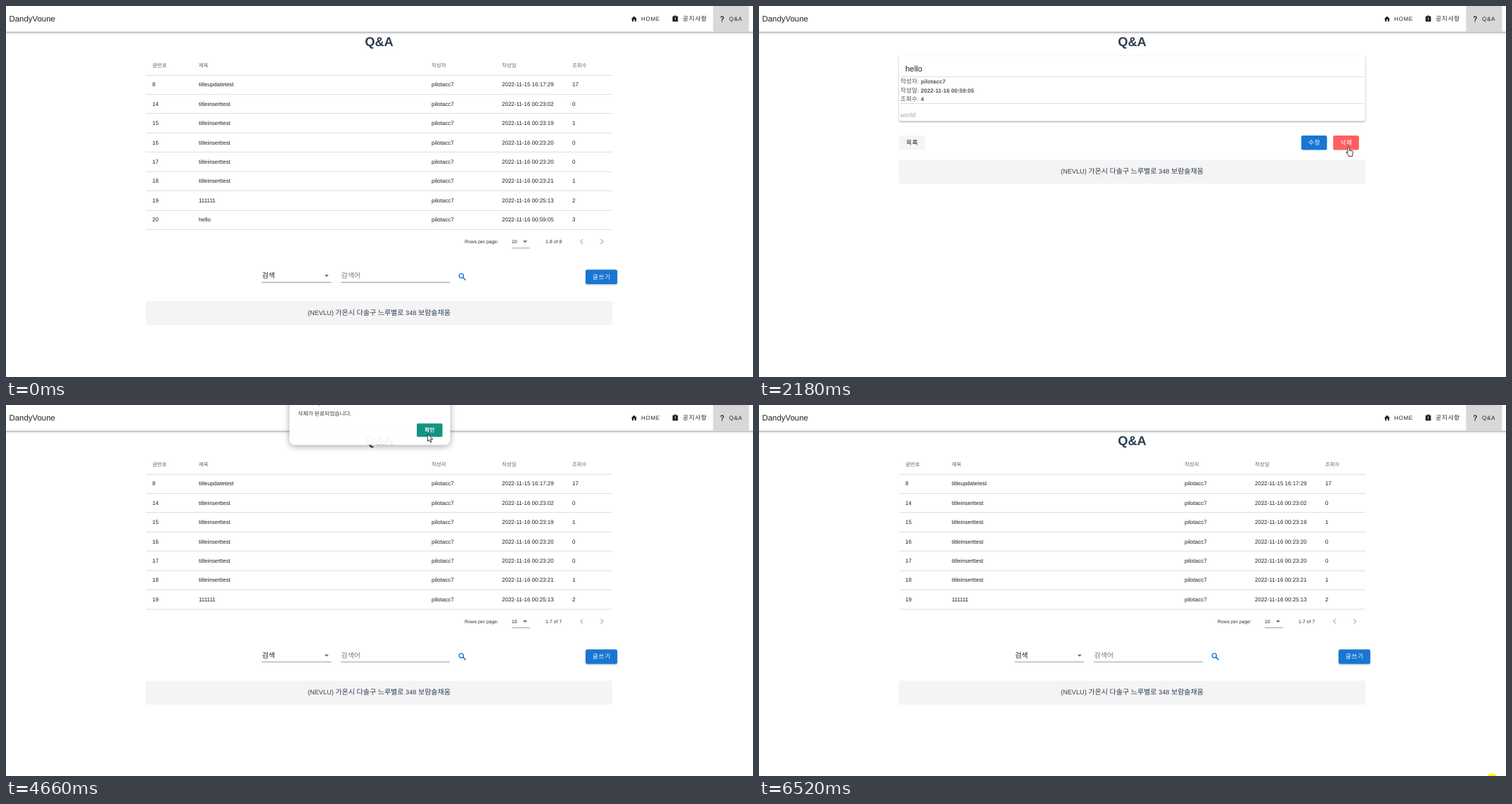
An HTML page for the animation above (6590 ms loop, 1062 px wide and 527 px high).

```html
<!DOCTYPE html>
<html lang="ko">
<head>
<meta charset="utf-8">
<title>Q&amp;A</title>
<style>
html, body { margin: 0; width: 100%; height: 100%; overflow: hidden; background: #fff; }
svg { display: block; width: 100vw; height: 100vh; }
text {
  font-family: "Liberation Sans", Arial, "Noto Sans CJK KR", "Noto Sans CJK", sans-serif;
  white-space: pre; text-rendering: geometricPrecision;
}
/* Hangul fills a full em here */
.ko { font-family: "Noto Sans CJK KR", "Noto Sans CJK", sans-serif; font-size: 1.087em; }
.btn { letter-spacing: .71px; font-weight: 500; }
.bar { filter: drop-shadow(0 1px 1.2px rgba(0,0,0,.32)) drop-shadow(0 1px 2px rgba(0,0,0,.16)); }
.card { filter: drop-shadow(0 1px .8px rgba(0,0,0,.4)); }
.raised { filter: drop-shadow(0 1px 1px rgba(0,0,0,.3)); }
.modal { filter: drop-shadow(0 2px 5px rgba(0,0,0,.36)); }
</style>
</head>
<body>
<svg id="stage" viewBox="0 0 1062 527" preserveAspectRatio="none"></svg>
<script>
const LOOP = 6590, LAG = 67;
const INK = '#212121', SOFT = '#666', BLUE = '#1976d2', NAVY = '#2c3e50';
const USER = 'pilotacc7';
const stage = document.getElementById('stage');

function add(parent, tag, attrs = {}) {
  const el = document.createElementNS('http://www.w3.org/2000/svg', tag);
  for (const k in attrs) el.setAttribute(k, attrs[k]);
  parent.appendChild(el);
  return el;
}
const group = (parent, attrs) => add(parent, 'g', attrs);
const box = (parent, x, y, width, height, fill, more) =>
  add(parent, 'rect', { x, y, width, height, fill, ...more });
const path = (parent, d, attrs) => add(parent, 'path', { d, ...attrs });

function text(parent, x, y, str, size, fill = INK, more) {
  const el = add(parent, 'text', { x, y, 'font-size': size, fill, ...more });
  for (const part of str.split(/([가-힣]+)/)) {
    if (!part) continue;
    const span = add(el, 'tspan', /[가-힣]/.test(part) ? { class: 'ko' } : {});
    span.textContent = part;
  }
  return el;
}
const icon = (parent, x, y, size, d, fill = INK) =>
  path(parent, d, { fill, 'fill-rule': 'evenodd', transform: `translate(${x} ${y}) scale(${size / 24})` });
const button = (parent, x, y, w, h, fill, label, ink, cls = '') => {
  const g = group(parent);
  box(g, x, y, w, h, fill, { rx: 2.3, class: cls });
  text(g, x + w / 2 + .35, y + h / 2 + 3, label, 8, ink, { 'text-anchor': 'middle', class: 'btn' });
  return g;
};
function footer(parent, y) {
  box(parent, 199, y, 663, 34, '#f4f4f4');
  text(parent, 530.5, y + 19.8, '(NEVLU) 가온시 다솔구 느루별로 348 보람솔채움', 9.2, NAVY, { 'text-anchor': 'middle' });
}
const show = (el, on) => el.setAttribute('visibility', on ? 'visible' : 'hidden');

// Page frame
text(stage, 530.5, 56.5, 'Q&A', 18.3, NAVY, { 'text-anchor': 'middle', 'font-weight': 700 });

// List page
const ROW = 27.43, TOP = 97.6;
const rowY = i => Math.round(TOP + ROW * i);
const COLS = [208, 274, 605, 705, 805];
const posts = [
  ['8', 'titleupdatetest', '15 16:17:29', '17'],
  ['14', 'titleinserttest', '16 00:23:02', '0'],
  ['15', 'titleinserttest', '16 00:23:19', '1'],
  ['16', 'titleinserttest', '16 00:23:20', '0'],
  ['17', 'titleinserttest', '16 00:23:20', '0'],
  ['18', 'titleinserttest', '16 00:23:21', '1'],
  ['19', '111111', '16 00:25:13', '2'],
  ['20', 'hello', '16 00:59:05', '3']
];
const list = group(stage);
['글번호', '제목', '작성자', '작성일', '조회수'].forEach((s, i) => text(list, COLS[i], 86.6, s, 6.86, SOFT));
const rows = posts.map(([id, title, date, views], i) => {
  const g = group(list), y = rowY(i);
  const glow = box(g, 199, y, 663, rowY(i + 1) - y, '#eee');
  [id, title, USER, '2022-11-' + date, views].forEach((s, c) => text(g, COLS[c], TOP + ROW * i + 16.7, s, 8));
  box(g, 199, y, 663, 1, '#dedede');
  return { g, glow };
});
const lower = group(list);
box(lower, 199, 317, 663, 1, '#dedede');
text(lower, 652, 337, 'Rows per page:', 6.86, '#333');
text(lower, 719, 337, '10', 6.86);
path(lower, 'M735 333.3h6l-3 3z', { fill: SOFT });
box(lower, 719, 343.5, 26, .8, '#8a8a8a');
const ranges = [8, 7].map(n => text(lower, 767, 337, `1-${n} of ${n}`, 6.86, '#333'));
const chevron = { fill: 'none', stroke: '#a8a8a8', 'stroke-width': 1.1 };
path(lower, 'M820 331.2l-3.3 3.4l3.3 3.4', chevron);
path(lower, 'M845.4 331.2l3.3 3.4l-3.3 3.4', chevron);
text(lower, 364, 386.3, '검색', 9.14);
path(lower, 'M452.8 381.8h6l-3 3z', { fill: SOFT });
box(lower, 363.5, 392, 99, .8, '#808080');
text(lower, 476.5, 386.3, '검색어', 9.14, '#777');
box(lower, 476, 392, 155, .8, '#808080');
add(lower, 'circle', { cx: 647.3, cy: 383.3, r: 3.1, fill: 'none', stroke: BLUE, 'stroke-width': 1.3 });
path(lower, 'M649.5 385.5l4 4', { stroke: BLUE, 'stroke-width': 1.6 });
button(lower, 824, 374.6, 45, 20.5, BLUE, '글쓰기', '#fff', 'raised');
footer(lower, 419);

// Detail page
const detail = group(stage);
box(detail, 199, 71, 663, 92.5, '#fff', { rx: 2, class: 'card' });
text(detail, 208, 93, 'hello', 11.43);
box(detail, 201, 100, 659, 1, '#dedede');
[['작성자', USER], ['작성일', '2022-11-16 00:59:05'], ['조회수', '4']].forEach(([k, v], i) => {
  const y = 110.1 + 12.55 * i;
  text(detail, 201, y, k + ':', 8, '#555');
  text(detail, 230, y, v, 8, '#555', { 'font-weight': 700, 'letter-spacing': .06 });
});
box(detail, 201, 138, 659, 1, '#dedede');
text(detail, 201, 157.5, 'world', 9.14, '#a8a8a8');
button(detail, 199, 184, 37, 20.5, '#f5f5f5', '목록', INK);
button(detail, 771, 184, 36.5, 20.5, BLUE, '수정', '#fff');
button(detail, 816.3, 184, 36.7, 20.5, '#ff5252', '삭제', '#fff');
const ripple = box(detail, 816.3, 184, 36.7, 20.5, '#fff', { rx: 2.3 });
footer(detail, 218.3);

// App bar
const bar = group(stage);
box(bar, -10, -10, 1082, 46.6, '#fff', { class: 'bar' });
box(bar, 1005.3, 0, 51, 36.6, '#d8d8d8');
text(bar, 4.5, 22.3, 'DandyVoune', 11.43);
icon(bar, 887.8, 13.3, 10.3, 'M10 20V14H14V20H19V12H22L12 3L2 12H5V20Z');
icon(bar, 946.3, 13.3, 10.3, 'M5 3H9A3 3 0 0 1 15 3H19A2 2 0 0 1 21 5V19A2 2 0 0 1 19 21H5A2 2 0 0 1 3 19V5A2 2 0 0 1 5 3ZM11 7V13H13V7ZM11 15V17H13V15Z');
icon(bar, 1013, 13.3, 10.3, 'M10 19H13V22H10ZM12 2C17.4 2.2 19.7 7.6 16.5 11.7C15.7 12.7 14.3 13.3 13.7 14.2C13 15 13 16 13 17H10C10 15.3 10 13.9 10.7 12.9C11.3 11.9 12.7 11.3 13.5 10.7C15.9 8.4 15.3 5.3 12 5A3 3 0 0 0 9 8H6A6 6 0 0 1 12 2Z');
[[903, 'HOME'], [962, '공지사항'], [1028, 'Q&A']].forEach(([x, s]) =>
  text(bar, x, 21.3, s, 8, INK, { 'letter-spacing': .71 }));

// Dialogs
function modal(bottom, message, okX) {
  const g = group(stage);
  box(g, 403, -30, 228.5, bottom + 30, '#fff', { rx: 7, class: 'modal' });
  text(g, 415, bottom - 58, 'demo page 0000 내용:', 7.3, '#333');
  text(g, 415, bottom - 42.2, message, 7.2, '#333');
  const y = bottom - 30.6;
  const ok = box(g, okX, y, 36.5, 19, '#05c2a4', { rx: 1.5 });
  text(g, okX + 18.2, y + 12.2, '확인', 6.9, '#fff', { 'text-anchor': 'middle', 'font-weight': 700 });
  if (okX < 580) {
    box(g, 584, y + .3, 36, 18.4, '#fff', { rx: 1.5, stroke: '#e4e4e4', 'stroke-width': .8 });
    text(g, 602, y + 12.2, '취소', 6.9, '#333', { 'text-anchor': 'middle' });
  }
  return { g, ok, x: okX, y };
}
const ask = modal(59.3, '삭제하시겠습니까?', 543.7);
const done = modal(56.8, '삭제가 완료되었습니다.', 584);

const glint = add(stage, 'ellipse', { cx: 1042, cy: 528, rx: 6.5, ry: 4.6, fill: '#fff200' });

// Pointer
const skin = { fill: '#fff', stroke: '#111', 'stroke-width': .85, 'stroke-linejoin': 'round' };
const arrow = path(stage, 'M.4 .4V10.6L2.8 8.4L4.4 12L6 11.3L4.4 7.7H7.8Z', skin);
const hand = path(stage, 'M-1 8.6V1.5A1.2 1.2 0 0 1 1.4 1.5V5.2L5.6 6.2Q6.6 6.5 6.6 7.6L5.8 11V13.4H.2V12L-3 8.6Q-3.8 7.3 -2.6 7Z', skin);

// start, end, steps, then waypoints evenly spread over the steps
const moves = [
  [170, 700, 9, [947, 511], [790, 395], [600, 320], [500, 295], [487, 290]],
  [830, 900, 2, [487, 296], [487, 303]],
  [1100, 1100, 1, [483, 296]],
  [1240, 1320, 2, [484, 299], [486, 302]],
  [1630, 2180, 9, [495, 298], [650, 240], [800, 192], [836, 192], [838, 200]],
  [2310, 2910, 10, [838, 200], [836, 200], [790, 180], [640, 138], [571, 124]],
  [2980, 3580, 10, [560, 108], [532, 80], [516, 58], [524, 50], [542.5, 46], [552, 43], [558, 41], [562, 40], [564, 40], [565, 40]],
  [3650, 4270, 10, [565, 40], [566, 41], [586, 46], [597, 41]],
  [4330, 4330, 1, [598.5, 41]],
  [4530, 5130, 9, [598.5, 41], [598.5, 41], [597, 44], [592, 80], [576, 165], [552, 276], [538, 313], [543, 322], [556, 306]],
  [5200, 5820, 10, [600, 258], [720, 275], [845, 392], [920, 463]],
  [5880, 5950, 2, [936, 486], [951, 511]]
];
const GONE = 6020;

function spline(pts, u) {
  const s = u * (pts.length - 1), i = Math.min(Math.floor(s), pts.length - 2), f = s - i;
  const at = k => pts[Math.max(0, Math.min(pts.length - 1, k))];
  return [0, 1].map(c => {
    const [a, b, d, e] = [at(i - 1)[c], at(i)[c], at(i + 1)[c], at(i + 2)[c]];
    return b + f / 2 * (d - a + f * (2 * a - 5 * b + 4 * d - e + f * (3 * (b - d) + e - a)));
  });
}
function pointer(t) {
  if (t >= GONE) return null;
  const move = moves.filter(m => t >= m[0]).pop();
  if (!move) return null;
  const [start, end, steps, ...pts] = move;
  if (steps < 2) return pts[0];
  const n = Math.floor((t - start) / (end - start) * (steps - 1) + .05);
  return spline(pts, Math.min(1, n / (steps - 1)));
}

const held = (t, keys) => keys.reduce((v, [at, next]) => t >= at ? next : v, 0);
const pageAt = t => t < 1240 ? 'full' : t < 4600 ? 'detail' : 'short';
const askAt = t => held(t, [[2440, .6], [2500, 1], [3650, .4], [3720, 0]]);
const doneAt = t => held(t, [[3910, .6], [3980, 1], [4660, .96], [4730, 0]]);
const rippleAt = t => held(t, [[2113, .08], [2310, .22], [2380, .42], [3720, .2], [3780, .08], [3850, 0]]);

// What the pointer rests on
function target(t) {
  const p = pointer(t);
  if (!p) return null;
  const inside = (x, y, w, h) => p[0] >= x && p[0] <= x + w && p[1] >= y && p[1] <= y + h;
  for (const [m, on] of [[ask, askAt(t)], [done, doneAt(t)]])
    if (on) return inside(m.x, m.y, 36.5, 19) ? { ok: m } : null;
  const page = pageAt(t);
  if (page === 'detail')
    return [199, 771, 816].some(x => inside(x, 184, 37, 20.5)) ? { link: true } : null;
  const count = page === 'full' ? 8 : 7;
  if (inside(199, rowY(0), 663, rowY(count) - rowY(0)))
    return { link: true, row: Math.min(count - 1, Math.floor((p[1] + .4 - TOP) / ROW)) };
  return inside(824, 374.6 - (8 - count) * ROW, 45, 20.5) ? { link: true } : null;
}

function draw(t) {
  const page = pageAt(t), hot = target(t - LAG) || {}, p = pointer(t);
  list.setAttribute('display', page === 'detail' ? 'none' : 'inline');
  detail.setAttribute('display', page === 'detail' ? 'inline' : 'none');
  rows[7].g.setAttribute('display', page === 'full' ? 'inline' : 'none');
  rows.forEach((r, i) => show(r.glow, hot.row === i));
  lower.setAttribute('transform', `translate(0 ${page === 'full' ? 0 : -27.4})`);
  show(ranges[0], page === 'full');
  show(ranges[1], page !== 'full');
  ripple.setAttribute('opacity', rippleAt(t));
  for (const [m, alpha] of [[ask, askAt(t)], [done, doneAt(t)]]) {
    m.g.setAttribute('opacity', alpha);
    m.ok.setAttribute('fill', hot.ok === m ? '#0a907c' : '#05c2a4');
  }
  show(glint, t >= 6520);
  show(arrow, p && !hot.link);
  show(hand, p && hot.link);
  if (p) for (const el of [arrow, hand]) el.setAttribute('transform', `translate(${Math.round(p[0])} ${Math.round(p[1])})`);
}

const born = performance.now();
function tick() {
  draw((performance.now() - born) % LOOP);
  requestAnimationFrame(tick);
}
tick();
</script>
</body>
</html>
```
